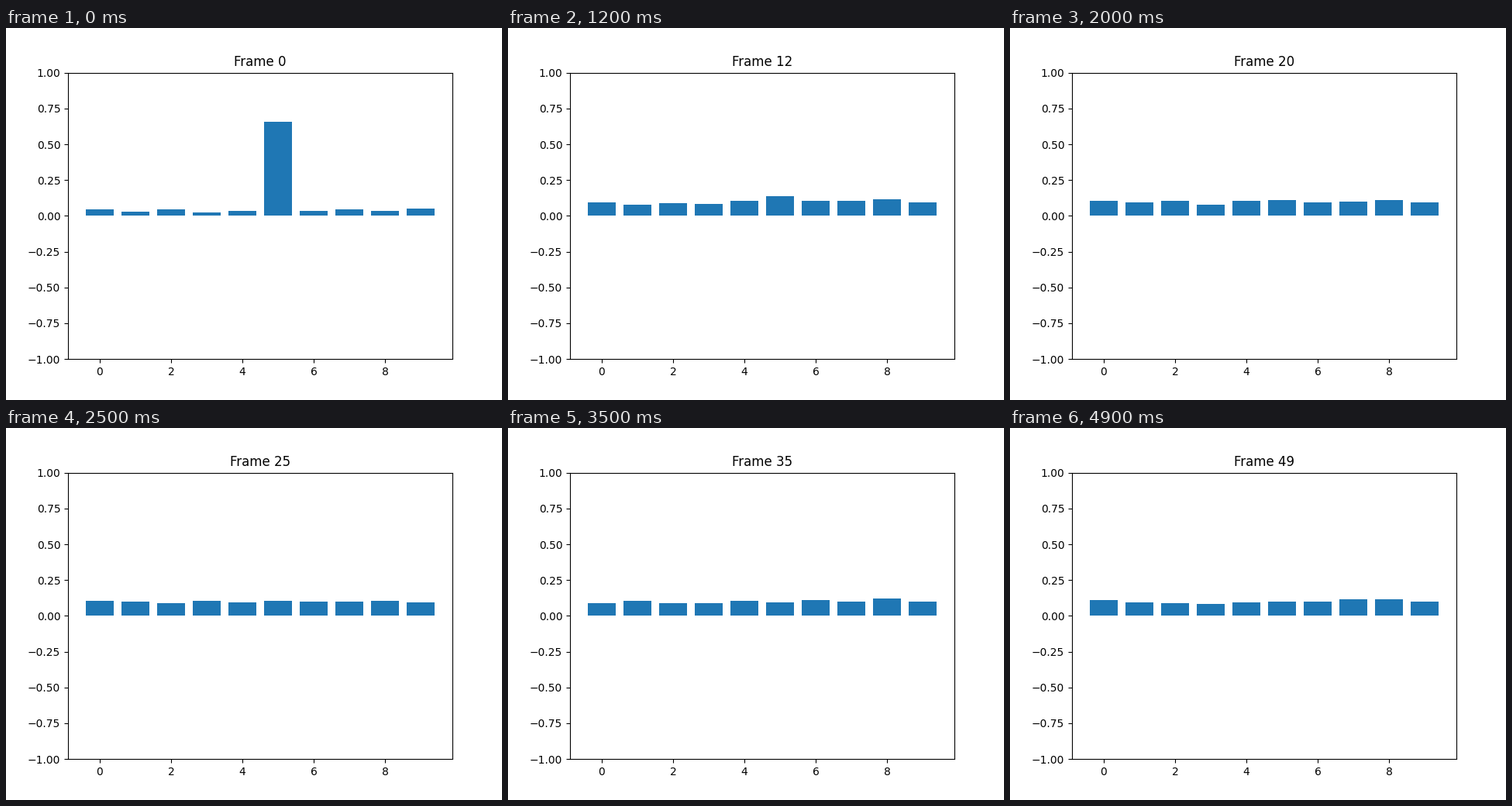
A matplotlib script for the animation above (5 s loop, 640 by 480 pixels).

```python
import matplotlib.pyplot as plt
import numpy as np
from matplotlib.animation import FuncAnimation

FRAMES, BINS, PARTICLES = 50, 10, 800
START_BIN, START_SHARE = 5, 0.615
JUMP_CHANCE = 0.18


def simulate():
    """Share of particles per bin while they hop at random to a uniform spread."""
    rng = np.random.default_rng(4)
    bins = rng.integers(BINS, size=PARTICLES)
    bins[:int(START_SHARE * PARTICLES)] = START_BIN
    shares = []
    for _ in range(FRAMES):
        shares.append(np.bincount(bins, minlength=BINS) / PARTICLES)
        jumps = rng.random(PARTICLES) < JUMP_CHANCE
        bins = np.where(jumps, rng.integers(BINS, size=PARTICLES), bins)
    return shares


shares = simulate()
fig, ax = plt.subplots(figsize=(6.4, 4.8), dpi=100)
bars = ax.bar(range(BINS), shares[0])
ax.set_ylim(-1, 1)
title = ax.set_title("Frame 0")


def update(frame):
    for bar, share in zip(bars, shares[frame]):
        bar.set_height(share)
    title.set_text(f"Frame {frame}")
    return [*bars, title]


anim = FuncAnimation(fig, update, frames=FRAMES, interval=100,
                     repeat=True, repeat_delay=0)
plt.show()
```
